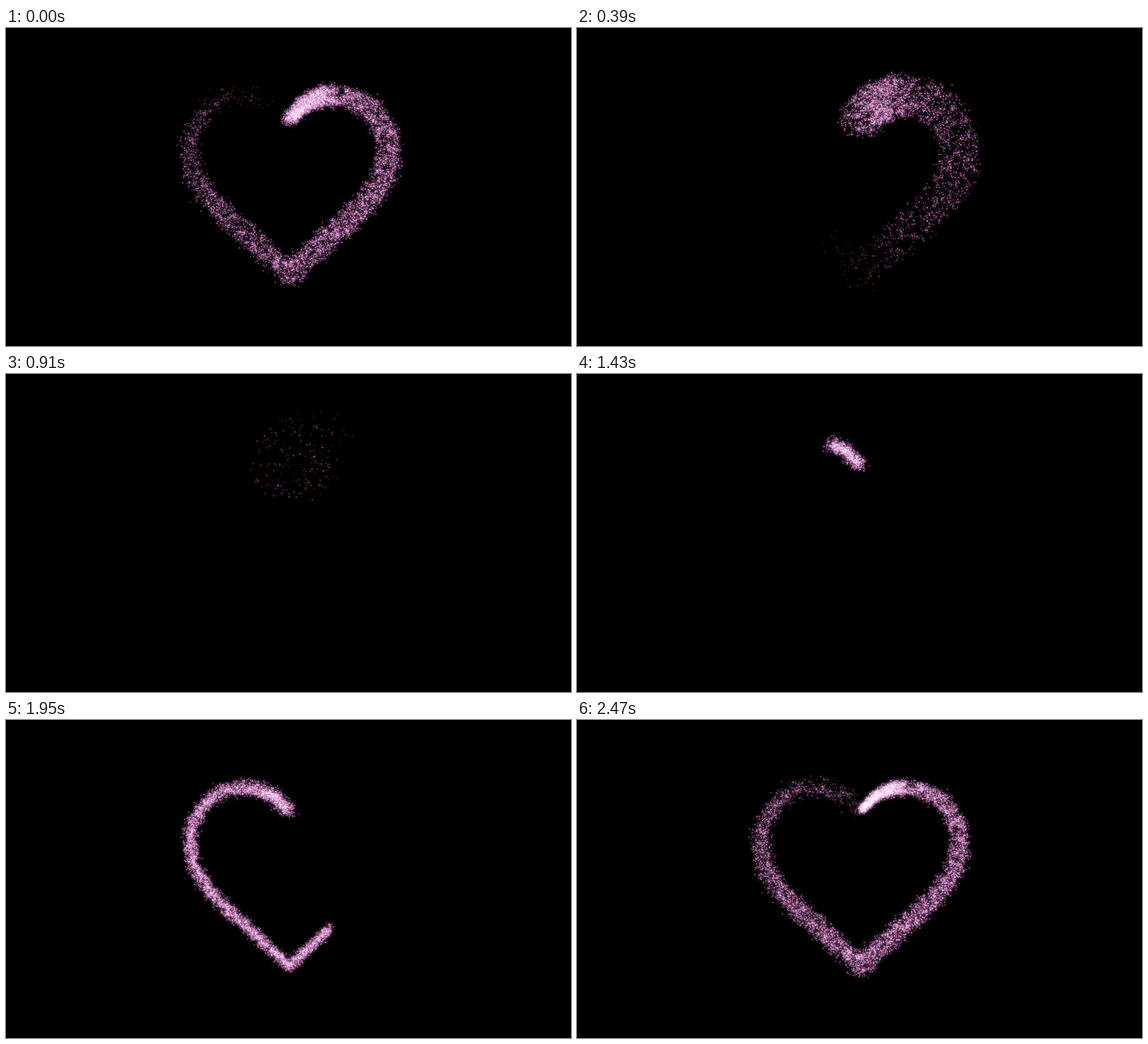
Recreate the animation shown at these times as an HTML page with a canvas. Size 997 by 561 pixels, loop 2600 ms.

```html
<!DOCTYPE html>
<html lang="en">
<head>
<meta charset="utf-8">
<title>Sparkling heart</title>
<style>
html, body { margin: 0; width: 100%; height: 100%; overflow: hidden; background: #000; }
canvas { display: block; }
</style>
</head>
<body>
<canvas id="stage" width="997" height="561"></canvas>
<script>
const LOOP = 2600, STEP = 130, START = 1330, EMIT = 1150, COUNT = 6900;
const ctx = document.getElementById('stage').getContext('2d');

let seed = 20214;
function rnd() {
  seed = seed + 0x6D2B79F5 | 0;
  let x = Math.imul(seed ^ seed >>> 15, seed | 1);
  x ^= x + Math.imul(x ^ x >>> 7, x | 61);
  return ((x ^ x >>> 14) >>> 0) / 4294967296;
}
const gauss = () => (rnd() + rnd() + rnd() - 1.5) * 2;

const heart = document.createElementNS('http://www.w3.org/2000/svg', 'path');
heart.setAttribute('d', 'M500 163A95 95 0 0 0 325 215C325 262 350 290 372 315L500 435' +
  'L628 315C650 290 675 262 675 215A95 95 0 0 0 500 163');
const total = heart.getTotalLength();

// Emitter travel: [ms since start, distance], slow at both ends
const travel = [[0, 0], [100, 68], [620, 632], [880, 927], [930, 980], [EMIT, 1068]];
function distance(u) {
  const i = travel.findIndex(k => k[0] >= u) || 1;
  const [a, from] = travel[i - 1], [b, to] = travel[i];
  return (from + (to - from) * (u - a) / (b - a)) * total / 1068;
}

// Later sparks start closer to the path but drift away faster
const sparks = Array.from({ length: COUNT }, (_, i) => {
  const u = EMIT * (i + rnd()) / COUNT;
  const p = heart.getPointAtLength(distance(u));
  const sigma = 6.5 - 3 * u / EMIT;
  const speed = (8 + 50 * (u / 1000) ** 1.5) * rnd() ** 0.36 / 1000;
  const dir = rnd() * Math.PI * 2;
  return {
    birth: START + u,
    life: 700 + 510 * rnd(),
    size: 0.75 + 0.45 * rnd(),
    x: p.x + gauss() * sigma,
    y: p.y + gauss() * sigma,
    vx: speed * Math.cos(dir),
    vy: speed * Math.sin(dir)
  };
});

// Pink core with a faint wide glow
const sprite = document.createElement('canvas');
sprite.width = sprite.height = 28;
const sc = sprite.getContext('2d');
const glow = sc.createRadialGradient(14, 14, 0, 14, 14, 14);
glow.addColorStop(0, 'rgb(220,90,165)');
glow.addColorStop(0.07, 'rgb(215,88,162)');
glow.addColorStop(0.2, 'rgb(8,6,9)');
glow.addColorStop(1, '#000');
sc.fillStyle = glow;
sc.fillRect(0, 0, 28, 28);

function draw(t) {
  ctx.globalCompositeOperation = 'source-over';
  ctx.globalAlpha = 1;
  ctx.fillStyle = '#000';
  ctx.fillRect(0, 0, 997, 561);
  ctx.globalCompositeOperation = 'screen';
  for (const s of sparks) {
    const age = (t - s.birth + LOOP) % LOOP;
    if (age >= s.life) continue;
    const fade = Math.min(1, (s.life - age) / 150);
    const w = 14 * s.size * (0.7 + 0.3 * fade);
    ctx.globalAlpha = 0.4 + 0.6 * fade;
    ctx.drawImage(sprite, s.x + s.vx * age - w / 2, s.y + s.vy * age - w / 2, w, w);
  }
}

const begin = performance.now();
let shown = -1;
function tick() {
  const t = Math.floor((performance.now() - begin) % LOOP / STEP) * STEP;
  if (t !== shown) draw(shown = t);
  requestAnimationFrame(tick);
}
tick();
</script>
</body>
</html>
```
